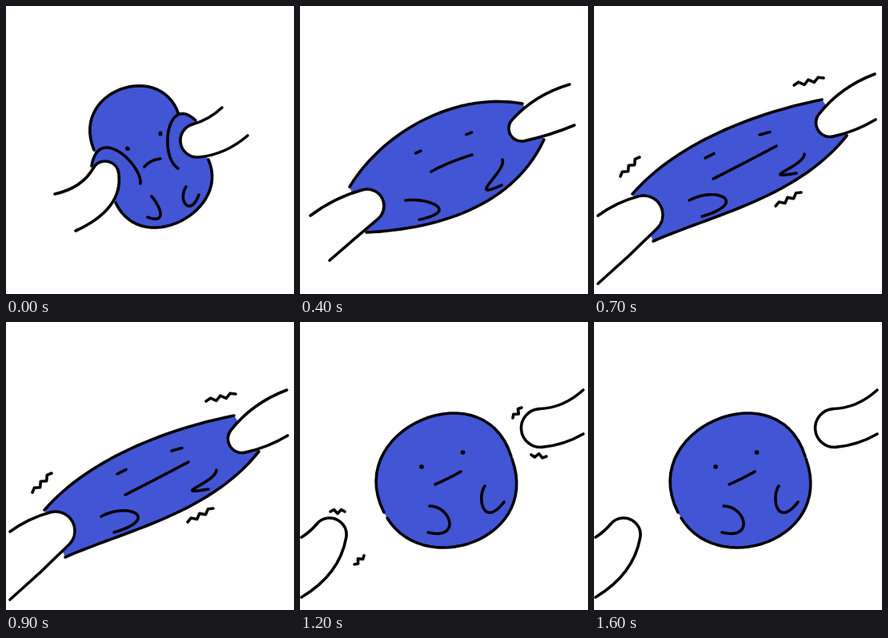
Recreate the animation shown at these times as an HTML page with a canvas. Size 360 px wide and 360 px high, loop 2100 ms.

```html
<!DOCTYPE html>
<html lang="en">
<head>
<meta charset="utf-8">
<title>Stretchy ball</title>
<style>
  html, body { margin: 0; width: 100%; height: 100%; overflow: hidden; background: #fff; }
  canvas { display: block; }
</style>
</head>
<body>
<canvas id="stage" width="360" height="360"></canvas>
<script>
const ctx = document.getElementById("stage").getContext("2d");
const BLUE = "#4255d4", LINE = 3.6, STEP = 100, LOOP = 2100, LAST_STEP = 16;
const RAD = Math.PI / 180;

// Lines hold a few x, y points that the curve passes through at equal intervals.
// Hands hold: first arm end, thumb centre, radius, start and end angle, second arm end.
const pinched = {
  top: [110,180, 119,120, 172,100, 216,136],
  bottom: [137,246, 188,277, 243,250, 253,192],
  handL: [61,235, 124,211, 17, -150,-8, 87,281],
  handR: [302,162, 239,168, 21, 85,255, 270,127],
  foldL: [107,200, 127,177, 155,194, 168,222],
  foldR: [237,143, 210,140, 202,173, 215,203],
  eyeL: [151.5,178, 152.5,178.5],
  eyeR: [193,159, 193,160],
  mouth: [173,201, 182,194, 193,191],
  legL: [182,238, 191,252, 192,264, 177,264],
  legR: [225,226, 222,243, 230,250, 241,236],
  eyeWidth: [5]
};
const pulled = {
  top: [62,226, 118,165, 194,127, 278,122],
  bottom: [83,283, 170,270, 249,234, 305,167],
  handL: [13,262, 84,250, 21, -105,50, 37,318],
  handR: [343,149, 277,153, 16, 78,222, 337,98],
  foldL: [72,230, 90,231, 103,243, 103,258],
  foldR: [276,130, 266,141, 261,153, 266,166],
  eyeL: [144.5,184, 151,181],
  eyeR: [208,160.5, 214.5,158],
  mouth: [164,207, 187,196, 215,186],
  legL: [132,243, 160,245, 174,255, 149,267],
  legR: [253,192, 245,211, 233,228, 252,224],
  eyeWidth: [LINE]
};
const taut = {
  top: [48,235, 115,180, 198,141, 285,117],
  bottom: [74,294, 157,262, 243,223, 316,162],
  handL: [5,262, 62,261, 24, -105,45, 5,347],
  handR: [352,142, 295,146, 17.5, 78,218, 351,85],
  eyeL: [139,190, 150,184.5],
  eyeR: [207,161, 220,157.5],
  mouth: [149,216, 190,195, 228,175],
  legL: [119,243, 152,236, 165,246, 135,263],
  legR: [263,185, 249,200, 233,210, 253,209],
  eyeWidth: [LINE]
};
const round = {
  top: [105,238, 115,149, 196,114, 264,168],
  bottom: [109,245, 178,282, 251,252, 265,171],
  handL: [2,269, 37,266, 21, -140,10, 2,344],
  handR: [354,140, 300.5,132.5, 24, 85,268, 354,85],
  eyeL: [151.8,181, 152.2,181],
  eyeR: [203.3,163, 203.7,163],
  mouth: [169,203, 186,195, 201,187],
  legL: [162,230, 183,241, 185,259, 160,263],
  legR: [231,205, 227,224, 235,238, 255,225],
  eyeWidth: [5.5]
};

// Start, end and number of segments of each trembling mark.
const strainMarks = [[33,213, 57,189, 6], [250,99, 287,90, 6], [227,250, 259,233, 6]];
const snapMarks = [[266,120, 277,107, 4], [308,168, 289,166, 4],
                   [38,237, 56,237, 4], [80,292, 68,303, 4]];

const mapPose = (pose, fn) =>
  Object.fromEntries(Object.keys(pose).map(key => [key, fn(pose[key], key)]));
const mix = (a, b, k) =>
  mapPose(b, (vals, key) => vals.map((v, i) => a[key][i] + (v - a[key][i]) * k));

// A slight redraw by hand: every value drifts by up to a pixel.
const wobble = vals => vals.length < 2 ? vals : vals.map((v, i) => v + Math.sin(i * 2.3 + v));

// Polynomial through all points of a line, sampled evenly.
function curve(pts, samples = 30) {
  const n = pts.length / 2;
  return Array.from({ length: samples + 1 }, (_, k) => {
    const s = k / samples * (n - 1);
    let x = 0, y = 0;
    for (let i = 0; i < n; i++) {
      let weight = 1;
      for (let j = 0; j < n; j++) if (j !== i) weight *= (s - j) / (i - j);
      x += weight * pts[2 * i];
      y += weight * pts[2 * i + 1];
    }
    return [x, y];
  });
}

function zigzag([x1, y1, x2, y2, count]) {
  const dx = x2 - x1, dy = y2 - y1, length = Math.hypot(dx, dy);
  return Array.from({ length: count + 1 }, (_, i) => {
    const side = i % count ? (i % 2 ? 2.4 : -2.4) / length : 0;
    return [x1 + dx * i / count + dy * side, y1 + dy * i / count - dx * side];
  });
}

function trace(points) {
  ctx.beginPath();
  points.forEach(p => ctx.lineTo(...p));
}

function stroke(points, width = LINE) {
  ctx.lineWidth = width;
  trace(points);
  ctx.stroke();
}

function fill(points) {
  ctx.fillStyle = BLUE;
  trace(points);
  ctx.fill();
}

// A round thumb tip whose two sides run on smoothly into the arm.
function drawHand([ax, ay, cx, cy, r, from, to, bx, by]) {
  const side = (degrees, turn, endX, endY) => {
    const c = Math.cos(degrees * RAD), s = Math.sin(degrees * RAD);
    const x = cx + r * c, y = cy + r * s;
    const reach = turn * Math.hypot(endX - x, endY - y) / 2;
    return { tip: [x, y], bend: [x - s * reach, y + c * reach] };
  };
  const first = side(from, -1, ax, ay), second = side(to, 1, bx, by);
  ctx.beginPath();
  ctx.moveTo(ax, ay);
  ctx.quadraticCurveTo(...first.bend, ...first.tip);
  ctx.arc(cx, cy, r, from * RAD, to * RAD);
  ctx.quadraticCurveTo(...second.bend, bx, by);
  ctx.fillStyle = "#fff";
  ctx.fill();
  ctx.lineWidth = LINE;
  ctx.stroke();
}

function drawPose(p) {
  const top = curve(p.top), bottom = curve(p.bottom);
  fill([...top, ...bottom.slice().reverse()]);
  stroke(top);
  stroke(bottom);
  for (const fold of [p.foldL, p.foldR].filter(Boolean).map(f => curve(f))) {
    fill(fold);
    stroke(fold);
  }
  drawHand(p.handL);
  drawHand(p.handR);
  for (const eye of [p.eyeL, p.eyeR]) stroke(curve(eye), p.eyeWidth[0]);
  for (const part of [p.mouth, p.legL, p.legR]) stroke(curve(part));
}

function scene(step) {
  if (step < 4) return [mix(pinched, pulled, step / 4), []];
  if (step < 6) return [mix(pulled, taut, (step - 4) / 2), []];
  if (step < 12) return [taut, strainMarks];
  return [round, step < 14 ? snapMarks : []];
}

// Two drawings alternate, first while taut, then again after the release.
const isRedrawn = step => step >= 6 && step % 2 === (step < 12 ? 0 : 1);

function render(time) {
  const step = Math.min(LAST_STEP, Math.floor(time % LOOP / STEP));
  let [pose, marks] = scene(step);
  if (isRedrawn(step)) {
    pose = mapPose(pose, wobble);
    marks = marks.map(([x1, y1, x2, y2, count]) => [...wobble([x1, y1, x2, y2]), count]);
  }
  ctx.fillStyle = "#fff";
  ctx.fillRect(0, 0, 360, 360);
  ctx.strokeStyle = "#000";
  ctx.lineCap = ctx.lineJoin = "round";
  drawPose(pose);
  marks.forEach(mark => stroke(zigzag(mark)));
}

const start = performance.now();
function tick() {
  render(performance.now() - start);
  requestAnimationFrame(tick);
}
tick();
</script>
</body>
</html>
```
